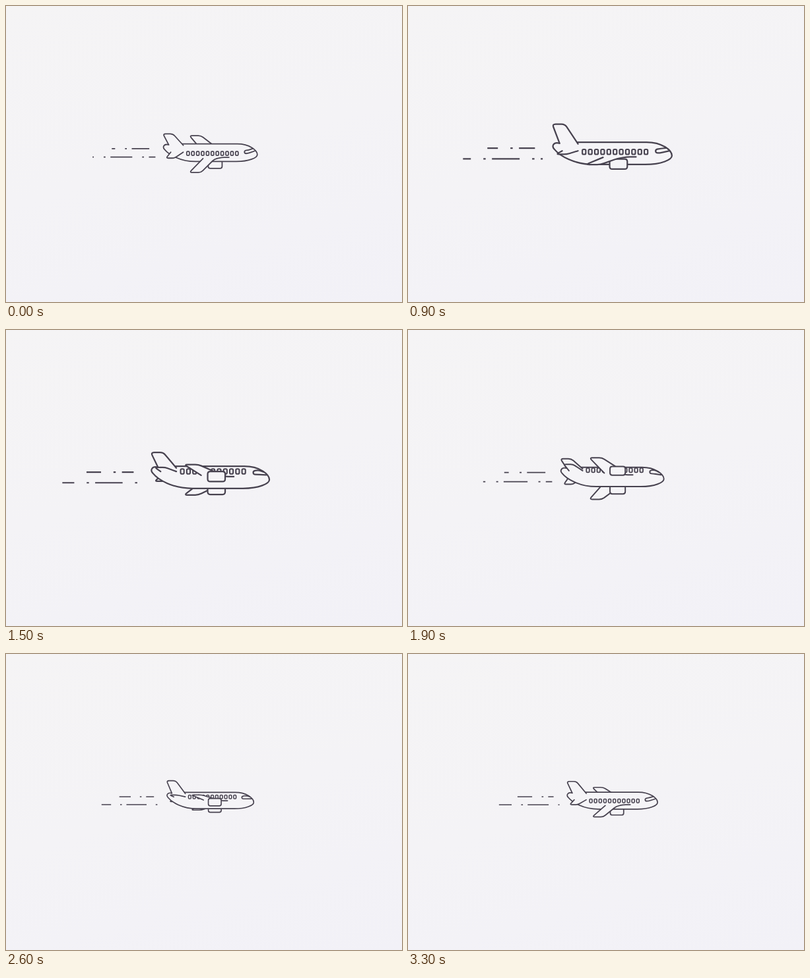
An HTML page that plays this animation: 600 by 450 pixels, repeating every 3.4 s.

```html
<!DOCTYPE html>
<html lang="en">
<head>
<meta charset="utf-8">
<title>Plane</title>
<style>
  html, body { margin: 0; width: 100%; height: 100%; overflow: hidden; }
  body { background: linear-gradient(165deg, #f5f4f5, #f4f3f6 50%, #f2f1f7); }
  svg { display: block; width: 100%; height: 100%; }
  #rig { stroke: #47424f; stroke-width: 2.25; stroke-linecap: round; stroke-linejoin: round; fill: #f5f4f7; }
  #windows { stroke-width: 2.1; }
  .trail { stroke-width: 2.1; stroke-linecap: butt; stroke-dasharray: 42 19 3.5 9.5; }
  #cockpit { fill: none; }
</style>
</head>
<body>
<svg viewBox="0 0 600 450">
  <g id="rig">
    <path class="trail" id="upper" d="M-189.5 -3.5H-117.3"/>
    <path class="trail" id="lower" d="M-226.5 12.8H-105.5"/>
    <path id="farWing"/>
    <path id="farEngine"/>
    <path id="farTail"/>
    <path id="body" d="M-80 -11C-90 -13.5 -92 -6 -88 -2C-80 8 -58 21.4 -28 21.4H50C75 21.4 90.5 14 90.5 8C90.5 0 76 -12.6 52 -12.6H-56"/>
    <g id="windows"></g>
    <path id="cockpit"/>
    <path id="fin"/>
    <path id="nearTail"/>
    <path id="wing"/>
    <path id="engine"/>
  </g>
</svg>
<script>
const LOOP = 3400, STEP = 100;
const $ = id => document.getElementById(id);

// Looping wave: every term is [harmonic, amplitude, phase in degrees]
const wave = (t, mean, ...terms) => terms.reduce((sum, [n, amp, phase]) =>
  sum + amp * Math.cos(2 * Math.PI * (n * t / LOOP - phase / 360)), mean);

const zoom = t => wave(t, .863, [1, .158, 113], [3, .018, 140]);
const roll = t => wave(t, -.5, [1, 6.5, 30], [3, .75, 20]);
// Start of a long dash; the 74-unit pattern passes ten times per loop
const dashStart = t => wave(t, -165, [1, 15, -10], [2, -2.5, 70]) - 740 * t / LOOP;

// Polyline with rounded corners
function rounded(pts, r, closed) {
  const n = pts.length;
  const toward = (p, q) => {
    const len = Math.hypot(q[0] - p[0], q[1] - p[1]) || 1, k = Math.min(r, len / 2) / len;
    return [p[0] + (q[0] - p[0]) * k, p[1] + (q[1] - p[1]) * k];
  };
  let d = closed ? "" : "M" + pts[0];
  pts.forEach((p, i) => {
    if (!closed && (i === 0 || i === n - 1)) return;
    const from = toward(p, pts[(i + n - 1) % n]), to = toward(p, pts[(i + 1) % n]);
    d += (d ? "L" : "M") + from + "Q" + p + " " + to;
  });
  return d + (closed ? "Z" : "L" + pts[n - 1]);
}

const draw = (id, pts, r, closed) => $(id).setAttribute("d", rounded(pts, r, closed));

function drawWing(id, tip, trail, lead, k) {
  const bend = lead + (tip - lead) * k;
  draw(id, [[-14, trail], [-40, tip], [-18, tip], [8, bend], [22, lead], [36, lead]], 5);
}

function drawEngine(id, y) {
  draw(id, [[-4, y - 7.7], [22.8, y - 7.7], [22.8, y + 7.7], [-4, y + 7.7]], 4, true);
}

function drawTail(id, tip, root) {
  draw(id, [[-76, root], [-85, tip], [-69, tip], [-52, root]], 4);
}

for (let i = 0; i < 11; i++) {
  const pane = document.createElementNS("http://www.w3.org/2000/svg", "rect");
  const box = { x: -45.4 + 9.4 * i, y: -3.8, width: 5.2, height: 7.6, rx: 1.8 };
  for (const key in box) pane.setAttribute(key, box[key]);
  $("windows").append(pane);
}

function pose(t) {
  const w = roll(t), p = dashStart(t);
  $("rig").setAttribute("transform", `translate(309.5 219.6) scale(${zoom(t)})`);
  $("upper").style.strokeDashoffset = -189.5 - p;
  $("lower").style.strokeDashoffset = -226.5 - p + 41;

  drawWing("farWing", 7.6 - 5.6 * w - .1 * w * w, 7.5 - .9 * w, 7.6 - .5 * w, .4);
  drawEngine("farEngine", 17 - 1.3 * w);
  drawTail("farTail", -2.45 * w - 1, -.75 * w - 1);
  $("farEngine").style.display = $("farTail").style.display = w < 0 ? "" : "none";

  $("windows").setAttribute("transform", `translate(0 ${w})`);
  const c = .55 * w - .8;
  draw("cockpit", [[82, -3.8], [74, c - 3.3], [65.5, c - 2], [66, c + 3.5], [72, c + 3.5], [86, .8]], 4);

  const top = -44.5 + 2.2 * Math.hypot(w - .2, .4);
  draw("fin", [[-80, -11], [-91, top], [-72, top], [-52, -10]], 5);
  drawTail("nearTail", 2.45 * w + .5, .75 * w - 1);

  drawWing("wing", 9.5 + 5.45 * w + .035 * w * w, 7.6 + 1.35 * w, 7.8 + .95 * w, .26 - .025 * w);
  drawEngine("engine", 16 + 2.35 * w - .085 * w * w);
  // The engine swings from in front of the wing to below the body
  if (w > 4) $("body").before($("engine"));
  else if (w > 0) $("wing").before($("engine"));
  else $("wing").after($("engine"));
}

let last = -1;
function tick() {
  const t = Math.floor(performance.now() % LOOP / STEP) * STEP;
  if (t !== last) pose(last = t);
  requestAnimationFrame(tick);
}
tick();
</script>
</body>
</html>
```
